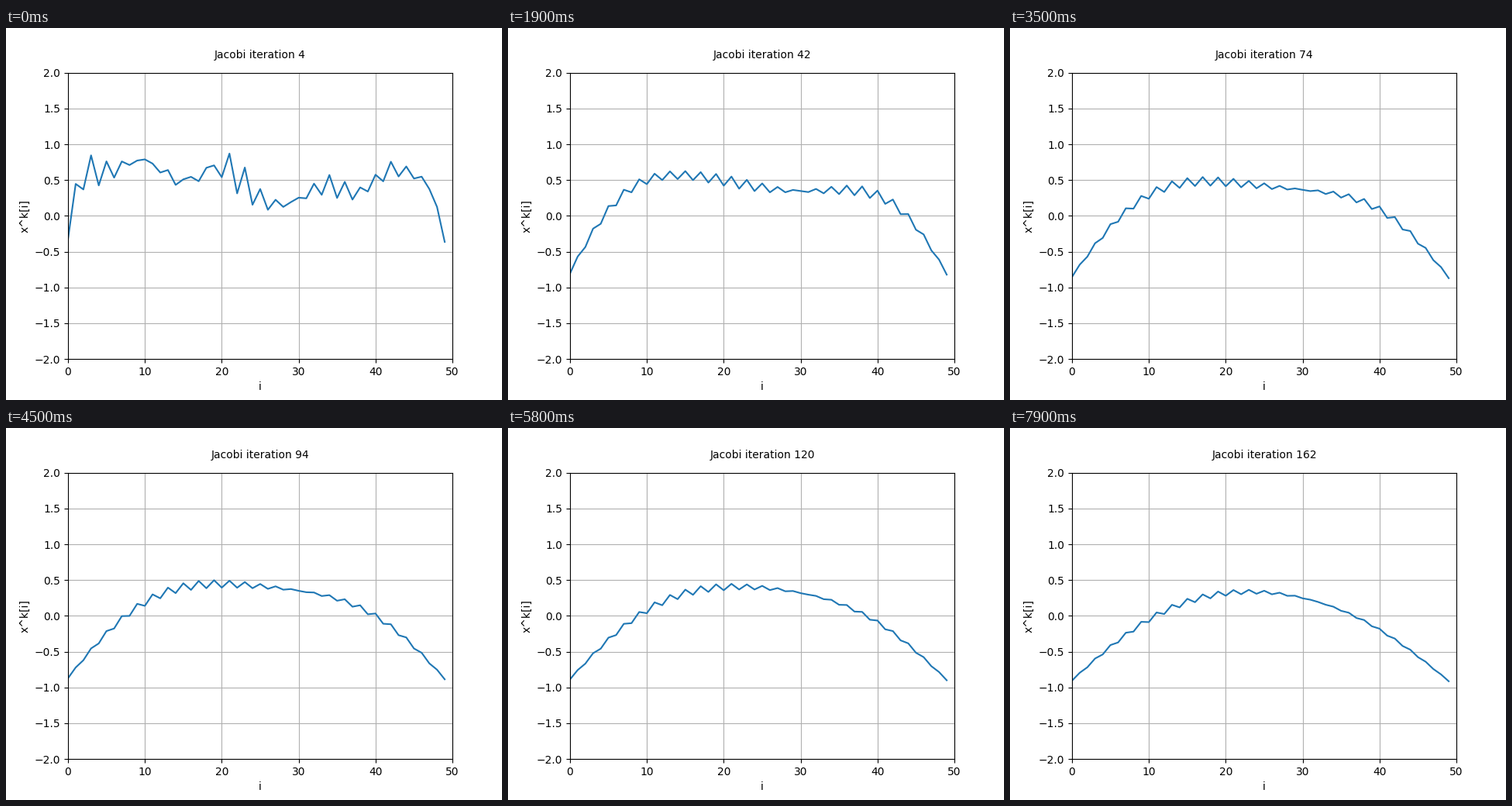
Write a matplotlib script that moves like this. It is 640 px wide and 480 px high and loops after 8 s.

```python
import numpy as np
import matplotlib.pyplot as plt
from matplotlib.animation import FuncAnimation

SIZE = 50
FRAMES = 80
FIRST = 4          # iteration shown at the start
STEP = 2           # sweeps per frame
EDGE = -1.0        # fixed value beyond both ends

# Sweeps never mix even and odd points, so each set has its own rough
# starting curve: key heights four points apart.
EVEN_KEYS = [.35, .5, .92, .29, .8, .28, .03, .22, .68, .27, .88, .5]
ODD_KEYS = [.97, .72, .8, .66, .36, 1.05, .3, .15, .34, .16, .52, .58, .17]


def curve(keys, first):
    i = np.arange(SIZE)
    return np.interp(i, first + 4 * np.arange(len(keys)), keys)


def advance(x):
    """Apply one frame's Jacobi sweeps for the 1D Laplace equation."""
    for _ in range(STEP):
        padded = np.pad(x, 1, constant_values=EDGE)
        x = (padded[:-2] + padded[2:]) / 2
    return x


index = np.arange(SIZE)
x = np.where(index % 2, curve(ODD_KEYS, 1), curve(EVEN_KEYS, 2))
states = []
for _ in range(FRAMES):
    x = advance(x)
    states.append(x)

fig, ax = plt.subplots(figsize=(6.4, 4.8), dpi=100)
ax.set(xlim=(0, SIZE), ylim=(-2, 2), xlabel="i", ylabel="x^k[i]")
ax.grid(True)
line, = ax.plot(index, states[0])
title = ax.text(0.5, 1.05, "", transform=ax.transAxes, ha="center")


def update(frame):
    line.set_ydata(states[frame])
    title.set_text(f"Jacobi iteration {FIRST + STEP * frame}")
    return line, title


anim = FuncAnimation(fig, update, frames=FRAMES, interval=100,
                     repeat=True, repeat_delay=0, blit=False)
plt.show()
```
